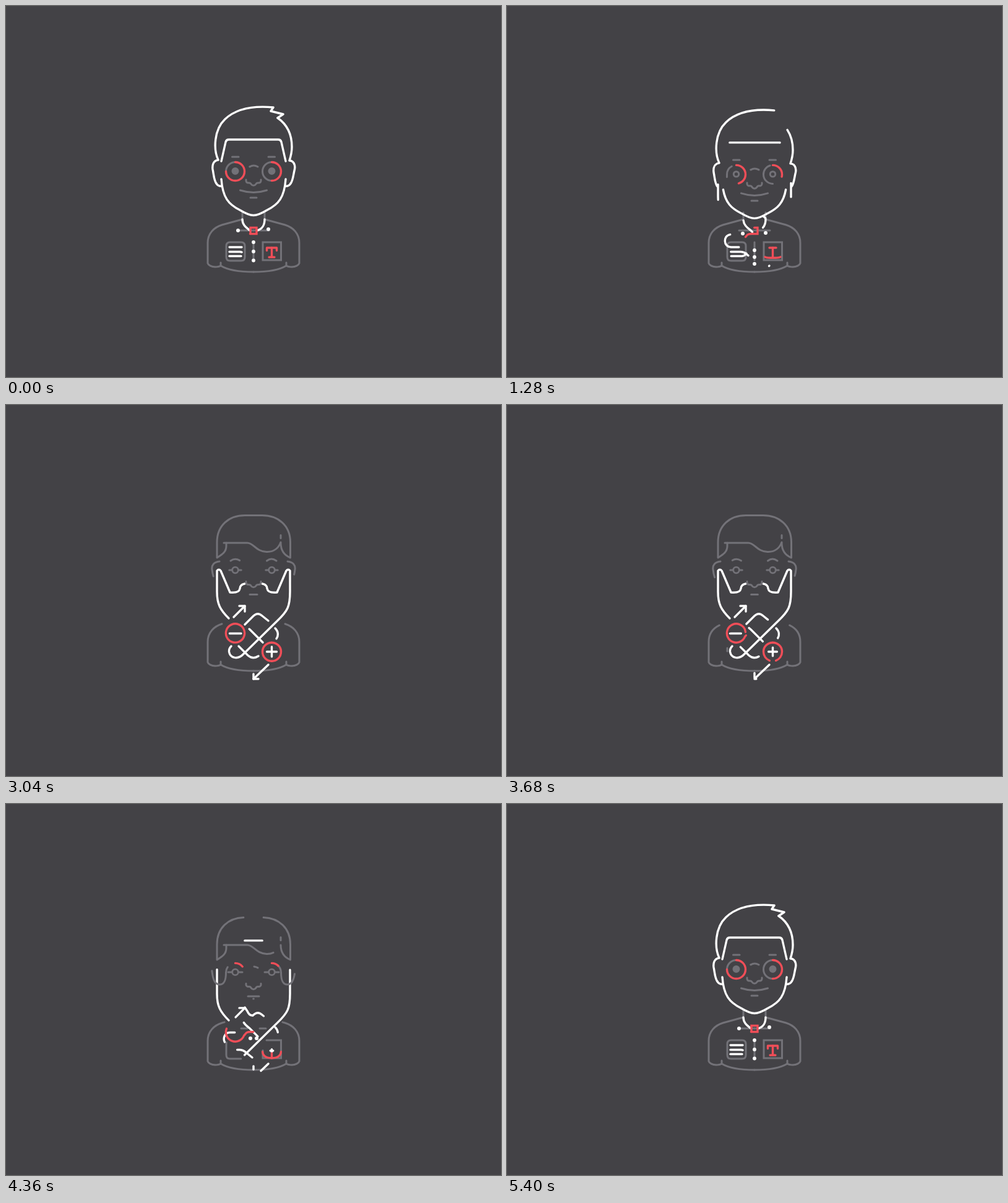
Recreate the animation shown at these times as an HTML page. Size 800 by 600 pixels, loop 6 s.

```html
<!DOCTYPE html>
<html lang="en">
<head>
<meta charset="utf-8">
<title>Line portrait</title>
<style>
html, body { margin: 0; width: 100%; height: 100%; overflow: hidden; background: #434246; }
svg { display: block; width: 100vw; height: 100vh; }
path { fill: none; stroke-linecap: round; stroke-linejoin: round; }
</style>
</head>
<body>
<svg id="stage" viewBox="0 0 800 600"><g id="body"></g><g id="head"></g></svg>
<script>
const NS = 'http://www.w3.org/2000/svg';
const WHITE = '#ffffff', GREY = '#737278', RED = '#f04e58';
const LOOP = 6000, STEP = 40;
const body = document.getElementById('body');
const head = document.getElementById('head');

// Six poses: smart, leaving smart, nearly bearded, bearded, leaving bearded, nearly smart.
const TIMES = [0, 600, 1280, 1880, 3040, 3200, 4000, 4360, 5300, 6000];
const POSES = [0, 0, 1, 2, 3, 3, 4, 5, 0, 0];
const parts = [];

function slope(v, i) {
  if (i === 0 || i === TIMES.length - 1) return 0;
  const l = (v[i] - v[i - 1]) / (TIMES[i] - TIMES[i - 1]);
  const r = (v[i + 1] - v[i]) / (TIMES[i + 1] - TIMES[i]);
  return l * r <= 0 ? 0 : 2 * l * r / (l + r);
}

// Smooth curve through the pose values that never overshoots them.
function track(six) {
  const v = POSES.map(p => six[p]);
  const m = v.map((_, i) => slope(v, i));
  return t => {
    let i = 0;
    while (i < TIMES.length - 2 && t >= TIMES[i + 1]) i++;
    const w = TIMES[i + 1] - TIMES[i], u = (t - TIMES[i]) / w, n = 1 - u;
    return v[i] * (1 + 2 * u) * n * n + m[i] * w * u * n * n
      + v[i + 1] * u * u * (3 - 2 * u) - m[i + 1] * w * u * u * n;
  };
}

function add(parent, tag, attrs) {
  const el = document.createElementNS(NS, tag);
  for (const k in attrs) el.setAttribute(k, attrs[k]);
  return parent.appendChild(el);
}

// A line of which only the part from start to end shows; "trim" holds one pair per pose.
function line(parent, color, d, trim, opts = {}) {
  const el = add(parent, 'path', { stroke: color, 'stroke-width': color === GREY ? 3 : 3.4, pathLength: 1 });
  if (opts.flip) el.setAttribute('transform', 'matrix(-1 0 0 1 800 0)');
  if (opts.sharp) el.style.strokeLinejoin = 'miter';
  if (typeof d === 'string') el.setAttribute('d', d);
  const pairs = (trim || Array(6).fill('0 1').join('|')).split('|').map(s => s.trim().split(' ').map(Number));
  const from = track(pairs.map(p => p[0])), to = track(pairs.map(p => p[1]));
  parts.push(t => {
    const a = from(t), len = to(t) - a;
    el.style.display = len < 0.004 ? 'none' : '';
    if (typeof d === 'function') el.setAttribute('d', d(t));
    el.setAttribute('stroke-dasharray', len > 0.998 ? 'none' : len + ' 3');
    el.setAttribute('stroke-dashoffset', -a);
  });
}

function both(parent, color, d, trim, opts) {
  line(parent, color, d, trim, opts);
  line(parent, color, d, trim, { ...opts, flip: true });
}

function dot(xs, ys, rs) {
  const el = add(body, 'circle', { fill: WHITE });
  const x = track(xs), y = track(ys), r = track(rs);
  parts.push(t => {
    el.setAttribute('cx', x(t));
    el.setAttribute('cy', y(t));
    el.setAttribute('r', Math.max(0, r(t)));
  });
}

// Shirt
both(body, GREY, 'M382 334 V345 L349 354 C336 358 326 368 326 383 V416 C327 419 332 422 338 422 Q344 422 347 420',
  '0 1|0 1|.4 1|.32 1|.385 1|.29 1');
both(body, GREY, 'M347 415 V420 C360 428 380 430 400 430');
both(body, GREY, 'M375 363 H400', '0 1|0 .95|.5 .5|.5 .5|.5 .5|.2 .6');
line(body, GREY, 'M400 382 V411', '0 1|0 1|1 1|1 1|1 1|1 1');
line(body, GREY, 'M386 397 V406 Q386 412 380 412 H362 Q356 412 356 406 V388 Q356 382 362 382 H380 Q386 382 386 388 V397',
  '0 1|0 1|.41 .58|.5 .5|.47 .57|.17 .6');
line(body, GREY, 'M421 382 H444.5 V411 H415 V382 H422', '0 1|0 1|.15 .2|.2 .2|.19 .2|0 .8', { sharp: true });

// Collar, list icon and buttons turn into the crossed strands
line(body, WHITE, 'M382 345 C382 354 388 358 394 363 L415 384', '0 .42|.03 .5|.3 .9|.41 1|.3 .9|.17 .78');
line(body, WHITE, 'M406 363 C414 361 418 354 418 345 Q418 342 414 340', '0 .78|.3 1|1 1|1 1|1 1|1 1');
line(body, WHITE, 'M386 355 L400 341 Q407 334.5 414 341 L424 349', '.6 .6|.6 .6|.1 .85|0 1|.07 .87|.38 .8');
line(body, WHITE, 'M386 329 L390 335 Q393 342 398 342', '1 1|1 1|1 1|0 0|0 0|0 1');
line(body, WHITE, 'M435 361 C441 367 440 374 437 378', '0 0|0 0|0 .85|0 1|0 .85|0 .5');
line(body, WHITE, 'M376 390 L391 405 Q399 412 408 406', '.5 .5|.5 .5|.18 .9|0 1|.12 .92|.5 .5');
line(body, WHITE, 'M381 390 H362 C349 390 349 369.5 362 369.5 H380',
  '0 .29|.09 .72|.68 .94|.73 1|.69 .94|.43 .85');
line(body, WHITE, 'M361 397.5 H378 Q384 398 388 402 L398 410', '0 .49|.02 .75|1 1|1 1|1 1|.31 1');
line(body, WHITE, 'M361 404.5 H380 Q384 404 387 400 L410 378', '0 .32|.02 .46|1 1|1 1|1 1|1 1');
for (const d of ['M421.5 399 H437.5', 'M429.5 391 V407'])
  line(body, WHITE, d, '.5 .5|.5 .5|.16 .84|0 1|.16 .84|.36 .64');
line(body, WHITE, 'M424 420 L400 443', '0 0|0 .02|0 .76|0 1|0 .8|0 .5');
line(body, WHITE, 'M400 420 V443', '0 0|0 0|.48 .7|.65 1|.5 .77|.17 .4');
line(body, WHITE, 'M400 443 H408', '0 0|0 0|0 0|0 1|0 0|0 0');
dot([375, 381, 400, 400, 400, 395], [363, 368, 384, 384, 384, 379], [3, 3, 0, 0, 0, 3]);
dot([424, 418, 400, 400, 400, 405], [361, 367, 384, 384, 384, 379], [3, 3, 0, 0, 0, 3]);
[[382, 395, 420], [397, 406, 428], [411.5, 417, 434]].forEach(([a, b, c]) =>
  dot(Array(6).fill(400), [a, b, c, c, c, c], [2.9, 2.9, 0, 0, 0, 0]));

// Bow knot and letter turn into the two red rings
line(body, RED, 'M395 368.5 V358.5 H405 V368.5 H395 C388 368.5 388 371 384.6 374.5 ' +
  'A15 15 0 0 1 356.4 363.5 A15 15 0 0 1 384.6 374.5',
  '0 .275|.1 .35|.3 .85|.362 1|.315 .88|.24 .68', { sharp: true });
line(body, RED, 'M421.5 395.5 V391 H437.5 V395.5', '0 1|.28 .72|.5 .5|.5 .5|.5 .5|.5 .5');
line(body, RED, 'M429.5 411 V391', '.25 1|.2 1|0 0|0 0|0 0|0 .4');
const bulge = track([0, 0.15, 1, 1, 1, 0.6]);
for (const s of [-1, 1]) {
  const x = n => 429.5 + s * n;
  line(body, RED, t => {
    const k = bulge(t), y = 406 + 8.2 * k;
    return `M429.5 ${y} C${x(8.3)} ${y} ${x(15)} ${409 - 1.5 * k} ${x(15)} 399 ` +
      `C${x(15)} 390.7 ${x(8.3)} 384.2 429.5 384.2`;
  }, '0 .1|0 .29|.15 .92|0 1|.17 1|0 .45');
}

// Beard; its right side runs on into the long diagonal strand
const tip = track([268, 268, 268, 268, 268, 262]);
function beard(side, t) {
  const x = n => 400 + side * n, y = tip(t);
  return `M${x(14)} 289 C${x(20)} 290 ${x(22)} 293 ${x(22)} 297 C${x(23)} 302 ${x(28)} 304 ${x(38)} 303 ` +
    `L${x(53)} ${y} Q${x(56)} ${y - 3.5} ${x(59)} ${y} V302 `;
}
line(head, WHITE, t => beard(-1, t) + 'C341 322 346 331 360 345',
  '.58 .58|.58 .735|0 1|0 1|0 1|.485 1');
line(head, WHITE, t => beard(1, t) + 'C459 326 455 333 439 348.5 L384 402.5 C374 413 362 409 360.5 399 Q360 394 364 390',
  '.32 .32|.32 .4|0 1|0 1|0 1|.285 .855');
line(head, WHITE, 'M368 343 L386 325', '1 1|1 1|0 1|0 1|0 1|.17 1');
line(head, WHITE, 'M377 325 H386 V334', '.5 .5|.5 .5|0 1|0 1|0 1|0 .5');

// Bearded hair
const hairTrim = '0 0|0 0|0 1|0 1|0 1|0 .885';
line(head, GREY, 'M356 223 V228 C356 238 349 242 341 247 V222 C341 195 360 178.5 386 178.5 H400', hairTrim);
line(head, GREY, 'M444 223 C444 235 450 243 459.5 247 V222 C459.5 195 440 178.5 414 178.5 H400', hairTrim);
line(head, GREY, 'M352 223 H390 C400 223 404 237 421 237.5 C434 238 441 230 444 222', '0 0|0 0|0 1|0 1|0 1|0 .82');
line(head, GREY, 'M444 210.5 V215.5', '0 0|0 0|0 1|0 1|0 1|0 1');

// Ears run into the grey part of the glasses
line(head, GREY, 'M345 253 C336 254 332 259 333 266 C334 276 337 287 345 287 C353 287 355.5 280 355.5 267.5 A15 15 0 0 1 370.5 252.5',
  '.75 1|.71 .92|0 .33|0 .33|0 .38|.2 .85');
line(head, GREY, 'M455 253 C464 254 468 259 467 266 C466 276 463 287 455 287 C447 287 444.5 280 444.5 267.5 ' +
  'A15 15 0 0 0 429.5 252.5 A15 15 0 0 0 414.5 267.5 A15 15 0 0 0 429.5 282.5',
  '.665 1|.7 1|0 .2|0 .2|0 .24|.17 .6');
line(head, RED, 'M370.5 252.5 A15 15 0 1 1 355.5 267.5', '0 1|0 .61|0 0|0 0|0 0|0 .19');
line(head, RED, 'M429.5 252.5 A15 15 0 0 1 429.5 282.5', '0 1|0 .58|0 0|0 0|0 0|0 .25');

// Brows, eyes, nose, mouth
both(head, GREY, 'M365.5 244 H376', '0 1|0 1|.5 .5|.5 .5|.5 .5|.5 .5');
line(head, GREY, 'M363 252 Q371 246 380 253 L394 260 Q400 256 407 260', '.71 1|.71 1|.08 .38|0 .33|.08 .38|.87 1');
line(head, GREY, 'M437 252 Q429 246 421.5 252', '0 0|0 0|0 1|0 1|0 1|0 0');
const eyeR = track([3, 4.2, 4.8, 4.8, 4.8, 4.8]), eyeW = track([6, 3, 2.8, 2.8, 2.8, 2.8]);
for (const cx of [370.5, 429.5]) {
  const eye = add(head, 'circle', { cx, cy: 267, fill: 'none', stroke: GREY });
  parts.push(t => {
    eye.setAttribute('r', eyeR(t));
    eye.setAttribute('stroke-width', eyeW(t));
  });
  for (const s of [-1, 1])
    line(head, GREY, `M${cx + 5.5 * s} 267 H${cx + 11.5 * s}`, '0 0|0 0|0 .7|0 .7|0 .7|0 1');
}
const noseY = track([0, 0, 4.5, 4.5, 4.5, 4.5]);
line(head, GREY, t => `M388 ${281 + noseY(t)} c-.5 3 1 5 3 5 q4 -.5 5 2 c2 3 6 3 8 0 q1 -2.5 5 -2 c2 0 3.5 -2 3 -5`);
const mouthW = track([21.5, 21.5, 5, 6, 5, 9]);
const mouthY = track([298, 298, 306.5, 306.5, 306.5, 306]);
const smile = track([7, 7, 0, 0, 0, 0]);
line(head, GREY, t => {
  const w = mouthW(t), y = mouthY(t);
  return `M${400 - w} ${y} Q400 ${y + smile(t)} ${400 + w} ${y}`;
});
line(head, GREY, 'M395 310 H405', '0 1|0 1|.5 .5|.5 .5|.5 .5|.47 .53');

// Smart hair, ears and jaw
line(head, WHITE, 'M439 181 L448 175 L428 170 L432 164 C400 161 372 166 354 183 C336 200 335 232 343 249 ' +
  'C336 250 333 256 334 264 C336 274 336 282 340 287',
  '0 1|.165 1|1 1|1 1|1 1|1 1');
line(head, WHITE, 'M439 181 C452 190 462 205 462 228 C462 238 460 244 458 250 C464 250 468 256 466.5 264 C464 274 464 282 460 287',
  '0 1|.17 1|1 1|1 1|1 1|1 1');
both(head, WHITE, 'M340 287 Q342 291 348 291.5', '0 1|0 0|0 0|0 0|0 0|0 0');
line(head, WHITE, 'M348 251 L355 220 Q356 216 360 216 H440 Q444 216 445 220 L452 251',
  '0 1|.245 .76|.5 .5|.5 .5|.5 .5|.41 .59');
line(head, WHITE, 'M348 280 C350 310 360 321 378 330 Q392 338.5 400 338.5 Q408 338.5 422 330 C440 321 450 310 452 280',
  '0 1|.07 .93|.5 .5|.5 .5|.5 .5|.5 .5');

// Head rises, drops past its place and settles
const NOD = [[0, 0], [460, -9], [740, 6.6], [1080, 0]];
function nod(t) {
  for (let i = 1; i < NOD.length; i++) {
    const [t0, y0] = NOD[i - 1], [t1, y1] = NOD[i];
    if (t >= t0 && t < t1) return y0 + (y1 - y0) * (1 - Math.cos(Math.PI * (t - t0) / (t1 - t0))) / 2;
  }
  return 0;
}

function draw(t) {
  head.setAttribute('transform', `translate(0 ${nod(t - 600) + nod(t - 3680)})`);
  for (const part of parts) part(t);
}

function tick() {
  draw(Math.floor(performance.now() % LOOP / STEP) * STEP);
  requestAnimationFrame(tick);
}
tick();
</script>
</body>
</html>
```
